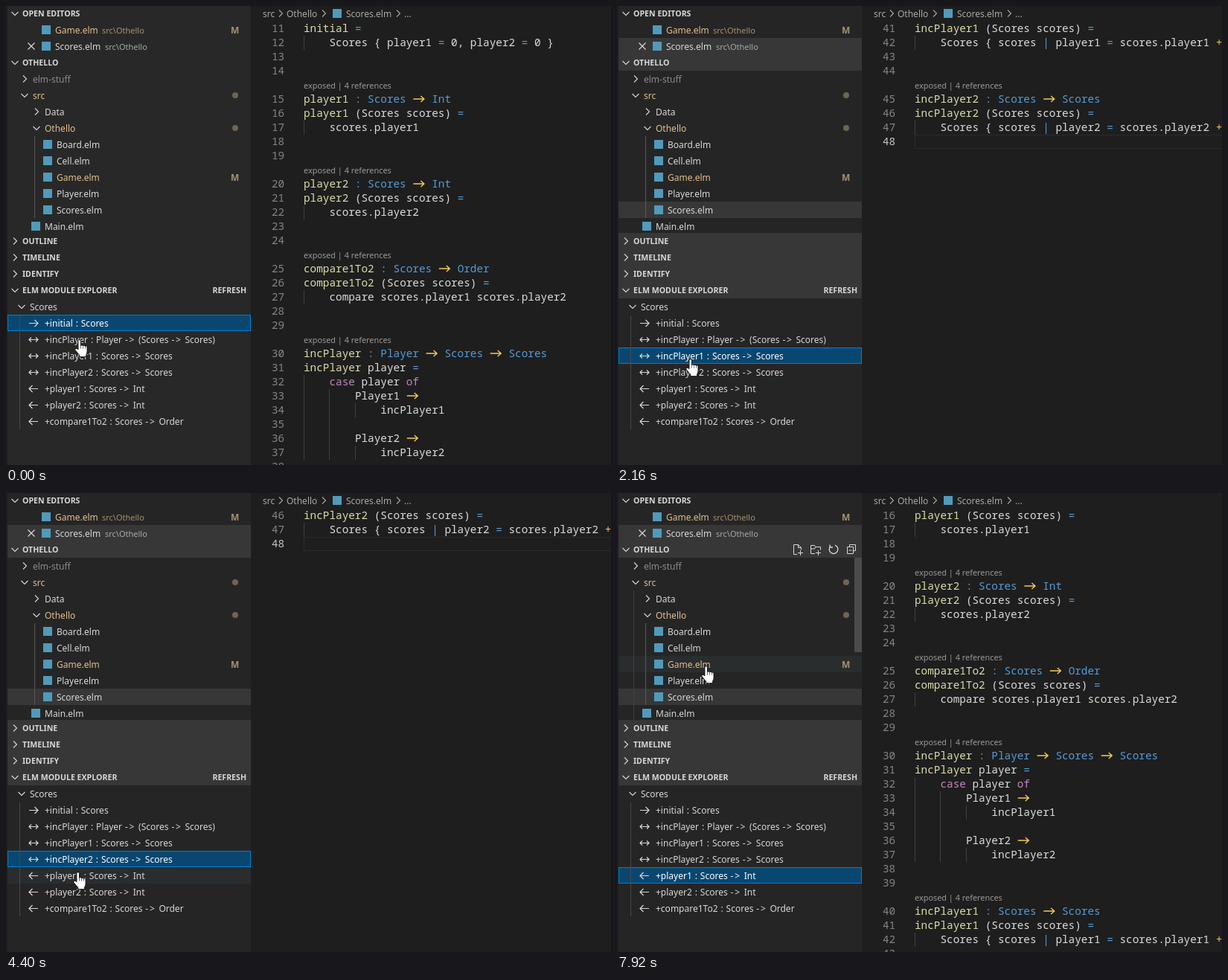
These frames come from a looping animation (813x617 px, 8 s). An HTML page:

```html
<!DOCTYPE html>
<html lang="en">
<head>
<meta charset="utf-8">
<title>Module explorer</title>
<style>
html, body { margin: 0; width: 100%; height: 100%; overflow: hidden; background: #1e1e1e; }
svg { display: block; }
text { white-space: pre; }
.ui { font: 12px "Noto Sans", "Open Sans", sans-serif; }
.dir { font: 11px "Noto Sans", "Open Sans", sans-serif; }
.lens { font: 10.9px "Noto Sans", "Open Sans", sans-serif; }
.head { font: bold 10.6px "Noto Sans", "Open Sans", sans-serif; }
.mark { font: 600 12px "Noto Sans", "Open Sans", sans-serif; }
.code { font: 500 14.35px "Noto Sans Mono", "DejaVu Sans Mono", monospace; }
.sig { word-spacing: .8px; }
.sig tspan { letter-spacing: 1.7px; }
</style>
</head>
<body>
<svg id="stage" width="813" height="617" viewBox="0 0 813 617">
  <defs><clipPath id="pane"><path d="M329 22H813V617H329Z"/></clipPath></defs>
</svg>
<script>
const SOURCE = `initial =
    Scores { player1 = 0, player2 = 0 }


@
player1 : Scores -> Int
player1 (Scores scores) =
    scores.player1


@
player2 : Scores -> Int
player2 (Scores scores) =
    scores.player2


@
compare1To2 : Scores -> Order
compare1To2 (Scores scores) =
    compare scores.player1 scores.player2


@
incPlayer : Player -> Scores -> Scores
incPlayer player =
    case player of
        Player1 ->
            incPlayer1

        Player2 ->
            incPlayer2


@
incPlayer1 : Scores -> Scores
incPlayer1 (Scores scores) =
    Scores { scores | player1 = scores.player1 + 1 }


@
incPlayer2 : Scores -> Scores
incPlayer2 (Scores scores) =
    Scores { scores | player2 = scores.player2 + 1 }
`;
const FIRST_LINE = 11, LINE_H = 19, CODE_X = 400, CHAR_W = 8.61, ROW_H = 22;
const GREY = '#d8d8d8', GOLD = '#e2c08d', DIM_GOLD = '#a8916e', CRUMB = '#a9a9a9';
const BLUE = '#569cd6', YELLOW = '#f5cb50';

const stage = document.getElementById('stage');
const add = (parent, tag, attrs = {}, text = '') => {
  const el = document.createElementNS('http://www.w3.org/2000/svg', tag);
  for (const k in attrs) el.setAttribute(k, attrs[k]);
  el.textContent = text;
  return parent.appendChild(el);
};
const group = (parent = stage, attrs) => add(parent, 'g', attrs);
const rect = (g, x, y, width, height, fill) => add(g, 'rect', { x, y, width, height, fill });
const label = (g, x, y, text, fill = GREY, cls = 'ui') => add(g, 'text', { x, y, fill, class: cls }, text);
const line = (g, d, stroke = GREY, width = 1) =>
  add(g, 'path', { d, stroke, fill: 'none', 'stroke-width': width });
const chevron = (g, x, y, open, color = GREY) =>
  line(g, open ? `M${x - 4.5} ${y - 2}l4.5 4.5l4.5-4.5` : `M${x - 2} ${y - 4.5}l4.5 4.5l-4.5 4.5`, color, 1.1);
const icon = (g, x, y) => rect(g, x, y - 6, 12, 12, '#519aba');
const show = (el, on) => el.setAttribute('visibility', on ? 'visible' : 'hidden');
const move = (el, x, y, scale = 1) => el.setAttribute('transform', `translate(${x} ${y}) scale(${scale})`);

// Editor
const editor = group(group(stage, { 'clip-path': 'url(#pane)' }));
const rowOf = {};
let number = FIRST_LINE;

function codeLine(y, text) {
  const indent = text.search(/\S|$/);
  const typed = / : /.test(text);
  for (const m of text.matchAll(/->|[\w.]+|[^\s\w]/g)) {
    const word = m[0], x = CODE_X + m.index * CHAR_W, base = y + 14;
    if (word === '->') {
      line(editor, `M${x + 1} ${base - 5}h14.5m-4.5-4l4.5 4l-4.5 4`, YELLOW, 1.4);
      continue;
    }
    let color = '#dcdcdc';
    if (/^[=:|]$/.test(word) || (typed && m.index)) color = BLUE;
    else if (word === '+') color = YELLOW;
    else if (/^(case|of)$/.test(word)) color = '#c586c0';
    else if (!indent && !m.index) color = '#dcdcaa';
    label(editor, x, base, word, color, 'code');
  }
}

const rows = SOURCE.split('\n');
rows.forEach((text, i) => {
  const y = i * LINE_H;
  if (text === '@') {
    label(editor, CODE_X, y + 14, 'exposed | 4 references', '#999999', 'lens');
    return;
  }
  const last = i === rows.length - 1;
  if (last) line(editor, `M820 ${y + .5}H400.5V${y + 18.5}H820`, '#2a2a2a');
  rowOf[number] = i;
  label(editor, 357, y + 14, number, last ? '#c6c6c6' : '#858585', 'code');
  const betweenBranches = !text && number === 35;
  const depth = betweenBranches ? 8 : text.search(/\S|$/);
  for (let col = 0; col < depth; col += 4)
    rect(editor, Math.round(CODE_X + col * CHAR_W), y, 1, LINE_H, '#404040');
  codeLine(y, text);
  number++;
});

// Breadcrumbs
const crumbs = group();
[[345, 'src'], [377, 'Othello'], [457, 'Scores.elm'], [535, '...']].forEach(([x, text]) =>
  label(crumbs, x, 15, text, CRUMB));
[369, 427, 527].forEach(x => chevron(crumbs, x, 10, false, CRUMB));
icon(crumbs, 439, 10);

// Sidebar backgrounds
const side = group();
const sideBack = rect(side, 2, 0, 327, 617, '#252526');
const tints = group(side);
[[43, 44], [263, 22], [305, 88]].forEach(([y, h]) => rect(tints, 2, y, 327, h, '#373738'));
const hoverBar = rect(side, 2, 0, 327, ROW_H, '#2a2d2e');
const selBar = group(side);
add(selBar, 'rect', { x: 2.5, y: .5, width: 326, height: 21, fill: '#094771', stroke: '#007fd4' });

// File tree
[['OPEN EDITORS', 10, true], ['OTHELLO', 76, true], ['OUTLINE', 316], ['TIMELINE', 338],
 ['IDENTIFY', 360], ['ELM MODULE EXPLORER', 382, true]].forEach(([name, y, open]) => {
  chevron(side, 12, y, open);
  label(side, 22, y + 4, name, GREY, 'head');
});
label(side, 323, 386, 'REFRESH', GREY, 'head').setAttribute('text-anchor', 'end');

const file = (x, y, name, color) => {
  icon(side, x, y);
  label(side, x + 18, y + 5, name, color);
};
const folder = (x, y, name, open, color) => {
  chevron(side, x, y, open);
  label(side, x + 11, y + 5, name, color);
};
file(48, 32, 'Game.elm', GOLD);
label(side, 129, 37, 'src\\Othello', DIM_GOLD, 'dir');
file(48, 54, 'Scores.elm');
label(side, 133, 59, 'src\\Othello', '#a8a8a8', 'dir');
line(side, 'M29.5 49.5l9 9m0-9l-9 9', GREY, 1.2);
folder(25, 98, 'elm-stuff', false, '#8c8c8c');
folder(25, 120, 'src', true, GOLD);
folder(41, 142, 'Data', false);
folder(41, 164, 'Othello', true, GOLD);
['Board', 'Cell', 'Game', 'Player', 'Scores'].forEach((name, i) =>
  file(50, 186 + i * ROW_H, name + '.elm', name === 'Game' ? GOLD : GREY));
file(34, 296, 'Main.elm');
rect(side, 38, 175, 1, 110, '#585858');
[32, 230].forEach(y => label(side, 302, y + 5, 'M', DIM_GOLD, 'mark'));
[120, 164].forEach(cy => add(side, 'circle', { cx: 308, cy, r: 4, fill: '#716550' }));

// Controls shown while the pointer is over the tree
const tools = group(side);
rect(tools, 22, 131, 1, 174, '#404040');
rect(tools, 319, 87, 10, 127, '#4b4b4c');
line(tools, 'M242 82.5h-4.5v-13h6l4 4v3m-4-7v4h4M246.5 77v7m-3.5-3.5h7');
line(tools, 'M266 81.5h-5.5v-11h5l1.5 2h6.5v4m-13-1.5h5l1.5-2.5M270.5 77v7m-3.5-3.5h7');
line(tools, 'M287 71.5a5.8 5.8 0 1 0 6-1.3M286 69.5v3.5h4', GREY, 1.3);
line(tools, 'M312.5 72.5v-3h8v8h-3M309.5 72.5h8v9h-8zM311.5 77h4');

// Module explorer
folder(21, 404, 'Scores', true);
rect(side, 18, 416, 1, 153, '#484848');
const ARROWS = {
  in: 'M31 .5h12m-4.5-4.5l4.5 4.5l-4.5 4.5',
  out: 'M43 .5h-12m4.5-4.5l-4.5 4.5l4.5 4.5',
  both: 'M31 .5h12m-3-3l3 3l-3 3M34-2.5l-3 3l3 3',
};
const entries = [
  ['in', 'initial : Scores'],
  ['both', 'incPlayer : Player -> (Scores -> Scores)'],
  ['both', 'incPlayer1 : Scores -> Scores'],
  ['both', 'incPlayer2 : Scores -> Scores'],
  ['out', 'player1 : Scores -> Int'],
  ['out', 'player2 : Scores -> Int'],
  ['out', 'compare1To2 : Scores -> Order'],
].map(([kind, text], i) => {
  const g = group(side, { class: 'sig' });
  move(g, 0, 426 + i * ROW_H);
  line(g, ARROWS[kind], GREY, 1.2);
  const t = label(g, 52, 5, '');
  ('+' + text).split(/(->)/).forEach(part =>
    part === '->' ? add(t, 'tspan', {}, part) : t.append(part));
  return t;
});

// Tooltip and pointer
const tip = group();
add(tip, 'rect', { x: 108.5, y: 490.5, width: 186, height: 22, fill: '#252526', stroke: '#5a5a5a' });
label(tip, 116, 506, '+incPlayer1 : Scores -> Scores');

const hand = group();
add(hand, 'path', {
  d: 'M4.5 12.5V2.2a1.6 1.6 0 0 1 3.2 0V8c.3-1.3 2.7-1.2 2.8.3c.3-1.2 2.6-1 2.7.5' +
     'c.4-1 2.3-.6 2.3 1V15q0 2-1.3 4V21.5H6.2V19.5Q4 17 1 13.3C0 11.3 2.5 10.3 4.5 12.5Z',
  fill: '#ffffff', stroke: '#111111', 'stroke-width': .9,
});
line(hand, 'M7.7 8v3.5M10.5 8.5v3M13.2 9v2.5', '#444444', .7);

// Time, top line, selected entry
const VIEWS = [[0, 11, 0], [260, 11, 1], [390, 31, 1], [2160, 41, 2], [3470, 46, 3], [4680, 16, 4]];
// Time, pointer x and y, centre of the hovered row
const POINTER = [
  [0, 92, 448, 0], [1080, 92, 449, 0], [1220, 92, 455, 0], [1345, 92, 465, 470], [1470, 92, 474, 470],
  [2710, 92, 478, 470], [2860, 92, 490, 492], [3010, 92, 496, 492],
  [4250, 90, 507, 514], [4400, 90, 509, 514],
  [7120, 120, 451, 470], [7250, 135, 384, 0], [7370, 145, 315, 0],
  [7520, 147, 260, 252], [7670, 136, 249, 252], [7795, 122, 239, 230], [7920, 113, 232, 230],
];
const at = (keys, t) => keys.findLast(k => k[0] <= t);

function draw(t) {
  const [, top, sel] = at(VIEWS, t), [, x, y, hover] = at(POINTER, t);
  move(editor, 0, 21 - rowOf[top] * LINE_H);
  move(selBar, 0, 415 + sel * ROW_H);
  entries.forEach((e, i) => e.setAttribute('fill', i === sel ? '#ffffff' : GREY));
  sideBack.setAttribute('fill', t < 260 ? '#282828' : '#252526');
  show(tints, t >= 260);
  show(hoverBar, hover);
  hoverBar.setAttribute('y', hover - 11);
  show(tools, t >= 7520);
  show(tip, t >= 1870 && t < 2010);
  move(hand, x, y, 1.1);
}

const start = performance.now();
function tick() {
  draw((performance.now() - start) % 8000);
  requestAnimationFrame(tick);
}
tick();
</script>
</body>
</html>
```
